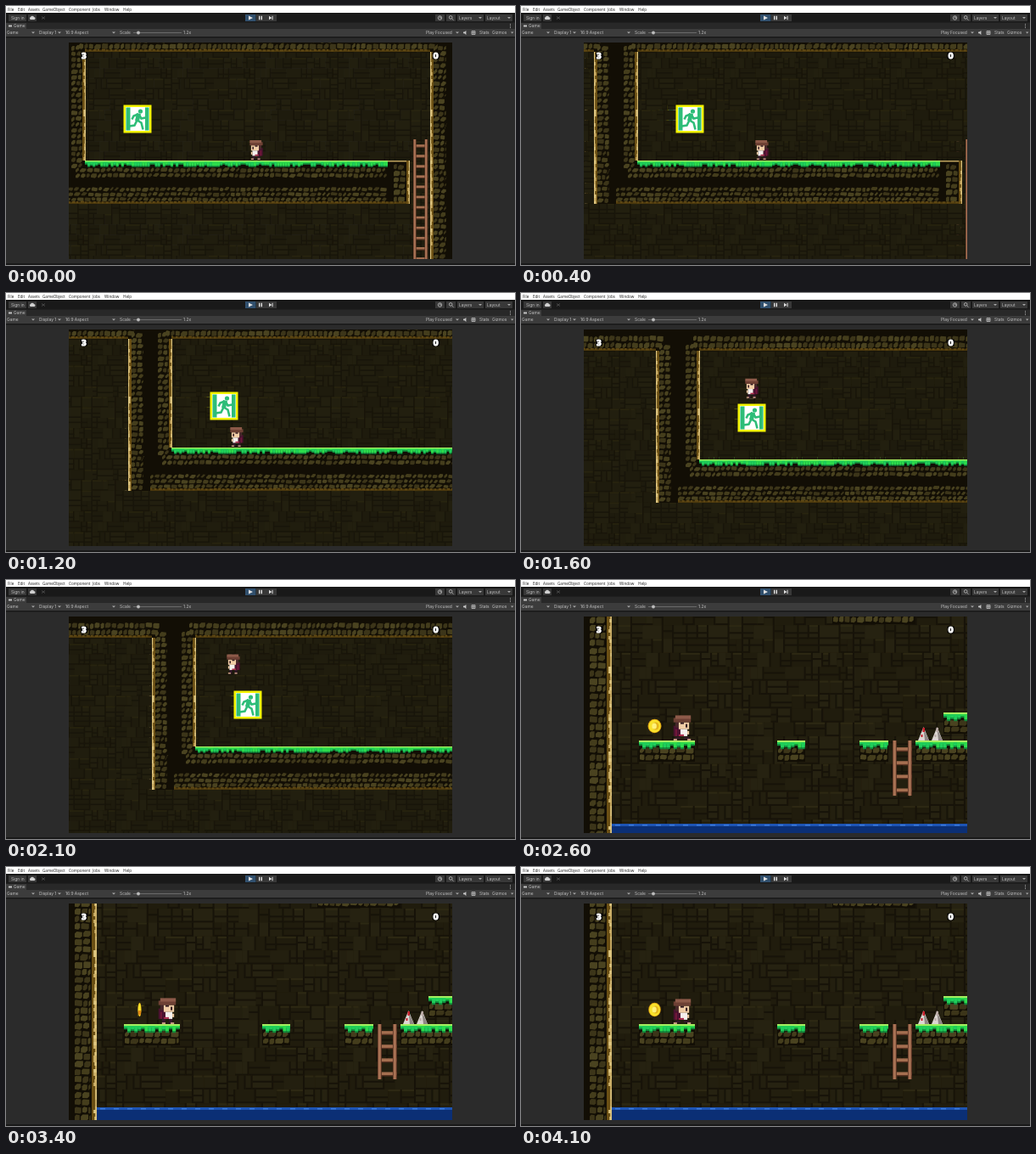
Recreate the animation shown at these times as an HTML page with a canvas. Size 600 px wide and 305 px high, loop 4200 ms.

```html
<!DOCTYPE html>
<html lang="en">
<head>
<meta charset="utf-8">
<title>Platformer in the editor</title>
<style>
html, body { margin: 0; width: 600px; height: 305px; overflow: hidden; background: #2b2b2b; }
svg, canvas { position: absolute; left: 0; top: 0; }
canvas { left: 74px; top: 43px; }
text { font: 4.9px Inter, sans-serif; fill: #c0c0c0; }
.menu text { font: 4.6px "Open Sans", sans-serif; fill: #222; }
</style>
</head>
<body>
<svg width="600" height="305">
  <rect width="600" height="8" fill="#fff"/>
  <g class="menu">
    <text x="2" y="5.6">File</text><text x="14" y="5.6">Edit</text><text x="26" y="5.6">Assets</text>
    <text x="43" y="5.6">GameObject</text><text x="74" y="5.6">Component</text><text x="102" y="5.6">Jobs</text>
    <text x="116" y="5.6">Window</text><text x="138" y="5.6">Help</text>
  </g>
  <path fill="#191919" d="M0 8h600v19H0zM0 36h600v1.5H0zM0 303h600v2H0z"/>
  <path fill="#383838" d="M3 10h21v8H3zM26 10h10v8H26zM295 10h24v8h-24zM506 10h11v8h-11zM519 10h11v8h-11zM532 10h31v8h-31zM565 10h32v8h-32z"/>
  <path fill="#282828" d="M0 19.5h600v7.5H0z"/>
  <path fill="#3c3c3c" d="M0 20h24v7H0zM0 27h600v9H0z"/>
  <path fill="#31506e" d="M282 10h12.5v8H282z"/>
  <path fill="#e0e0e0" d="M286 11.5l5 2.5-5 2.5zM298 11.8h1.4v4.4H298zM300.6 11.8h1.4v4.4h-1.4zM310 11.8l3.4 2.2-3.4 2.2zM313.6 11.8h1v4.4h-1z"/>
  <path fill="#d0d0d0" d="M29 16a1.6 1.6 0 0 1 0-3a2.2 2.2 0 0 1 4 0a1.5 1.5 0 0 1 0 3z"/>
  <path fill="none" stroke="#484848" d="M42 12.5l4 3m0-3l-4 3"/>
  <g fill="none" stroke="#c4c4c4" stroke-width=".8">
    <circle cx="511.5" cy="14" r="2.2"/><path d="M511.5 12.6V14h1.3M525.6 14.8l1.9 1.9"/><circle cx="524.2" cy="13.4" r="1.8"/>
    <path d="M549 29.5h4v4h-4zM551 29.5v4M549 31.5h4"/>
  </g>
  <path fill="#c4c4c4" d="M539 30.5h1.4l2-1.6v5l-2-1.6H539zM3 22.5h4v2H3z"/>
  <path fill="#aaa" d="M557 13h4l-2 2zM591 13h4l-2 2zM30 30.5h4l-2 2zM61 30.5h4l-2 2zM125 30.5h4l-2 2zM530 30.5h4l-2 2zM595 30.5h3.4l-1.7 2zM594 21h1v1h-1zM594 23h1v1h-1zM594 25h1v1h-1z"/>
  <path stroke="#6a6a6a" d="M150 31.5h57"/><circle cx="156" cy="31.5" r="1.9" fill="#bbb"/>
  <text x="6" y="15.9">Sign in</text><text x="534" y="15.9">Layers</text><text x="567" y="15.9">Layout</text>
  <text x="9" y="25.4">Game</text><text x="1" y="33.3">Game</text><text x="39" y="33.3">Display 1</text>
  <text x="70" y="33.3">16:9 Aspect</text><text x="134" y="33.3">Scale</text><text x="209" y="33.3">1.2x</text>
  <text x="495" y="33.3">Play Focused</text><text x="558" y="33.3">Stats</text><text x="573" y="33.3">Gizmos</text>
</svg>
<canvas width="452" height="255"></canvas>
<script>
const LOOP = 4200, STEP = 100, CUT = 2400;
const DARK = '#120e05';
const canvas = document.querySelector('canvas');
let g = canvas.getContext('2d');

let seed = 1;
const rand = () => (seed = seed * 16807 % 2147483647) / 2147483647;
const pick = list => list[Math.floor(rand() * list.length)];

function box(color, x, y, w, h) {
  g.fillStyle = color;
  g.fillRect(x, y, w, h);
}

// Linear interpolation through [time, value] points
function track(t, points) {
  let i = 1;
  while (i < points.length - 1 && t > points[i][0]) i++;
  const [t0, a] = points[i - 1], [t1, b] = points[i];
  return a + (b - a) * (t - t0) / (t1 - t0);
}

function makeBricks(scale, colors, line, light) {
  const tile = document.createElement('canvas'), screen = g;
  tile.width = tile.height = Math.round(64 * scale);
  g = tile.getContext('2d');
  g.scale(tile.width / 64, tile.width / 64);
  seed = 977;
  for (let y = 0; y < 64; y += 8) {
    for (let x = 0; x < 64;) {
      const w = Math.min(64 - x, pick([4, 6, 8, 12])), split = pick([0, 0, 3, 4]);
      box(pick(colors), x, y, w, 8);
      if (rand() < .6) box(line, x, y + 7, w, 1);
      if (rand() < .7) box(line, x + w - 1, y, 1, 8);
      if (split) box(line, x, y + split, w, 1);
      if (rand() < .3) box(light, x, y, w - 1, 1);
      x += w;
    }
  }
  g = screen;
  return g.createPattern(tile, 'repeat');
}

function stones(x, y, w, h, size = 7) {
  seed = 4321 + Math.round(w * 7 + h * 13);
  const rows = Math.max(1, Math.round(h / size)), rh = h / rows;
  for (let r = 0; r < rows; r++) {
    for (let dx = 0; dx < w - 2;) {
      const cw = Math.min(w - dx, size * (.7 + rand() * .6));
      const px = x + dx, py = y + r * rh + rand(), pw = cw - 1.3, ph = rh - 1 - rand(), c = 1 + rand() * 1.8;
      g.fillStyle = pick(['#4a4320', '#443d1c', '#3c3519']);
      g.beginPath();
      g.moveTo(px + c, py);
      g.lineTo(px + pw, py + rand());
      g.lineTo(px + pw, py + ph - c);
      g.lineTo(px + pw - c, py + ph);
      g.lineTo(px, py + ph - rand());
      g.lineTo(px, py + c);
      g.fill();
      dx += cw;
    }
  }
}

// The bright rim faces left (-1) or right (1)
function wallEdge(x, y, h, side, w = 4) {
  box('#6a4f14', x, y, w, h);
  seed = 77;
  for (let d = 0; d < h; d += 4) {
    const rim = w * pick([.3, .45, .65]);
    box(pick(['#dcc47e', '#cdb068']), side < 0 ? x : x + w - rim, y + d, rim, Math.min(4, h - d));
  }
}

function flatEdge(x, y, w) {
  box('#4b380d', x, y, w, 2.5);
  seed = 31;
  for (let d = 0; d < w - 4; d += 5) box('#5f4814', x + d, y - 1 + rand(), 2 + rand() * 2, 2);
}

function grass(x, y, w, k) {
  box('#128a3c', x, y, w, 3 * k);
  box('#26cf46', x, y, w, 2.4 * k);
  box('#a4f060', x, y, w, k);
  seed = 55;
  for (let d = 0; d < w - k; d += 2 * k) {
    const drop = pick([2, 3, 4, 4]) * k, dw = Math.min(2 * k, w - d);
    box('#128a3c', x + d, y + 2 * k, dw, drop - k);
    box(pick(['#1fcf5a', '#2cdc4c']), x + d, y + k, dw, drop - k);
  }
}

function ladder(x, y, h, k) {
  const w = 11.2 * k;
  for (let d = 4 * k; d < h - k; d += 7.9 * k) {
    box('#a56f50', x, y + d, w, 1.8 * k);
    box('#5c3424', x, y + d + 1.8 * k, w, .6 * k);
  }
  for (const rx of [x, x + w - 2.4 * k]) {
    box('#5c3626', rx, y, 2.4 * k, h);
    box('#a87254', rx + .4 * k, y, 1.5 * k, h);
  }
}

function platform(x, y, w, h = 25) {
  box(DARK, x, y, w, h);
  stones(x + 1, y + 8, w - 1, h - 9, 9);
  grass(x, y, w, 2.04);
}

function exitSign(x, y) {
  const green = '#2dbd78';
  box('#f4f400', x, y, 33, 33);
  box('#fff', x + 2.5, y + 2.5, 28, 28);
  box(green, x + 3, y + 3, 5, 27);
  box(green, x + 25.5, y + 3, 4.5, 27);
  g.strokeStyle = g.fillStyle = green;
  g.beginPath();
  g.arc(x + 20, y + 7.5, 2.6, 0, 7);
  g.fill();
  g.lineWidth = 5;
  g.beginPath();
  g.moveTo(x + 18, y + 10);
  g.lineTo(x + 16, y + 19);
  g.stroke();
  g.lineWidth = 2.6;
  g.beginPath();
  for (const limb of [[17, 11, 12, 13, 10, 17], [18, 11, 21, 16, 26, 15], [16, 18, 21, 21, 23, 29], [16, 18, 13, 24, 7, 25]]) {
    g.moveTo(x + limb[0], y + limb[1]);
    g.lineTo(x + limb[2], y + limb[3]);
    g.lineTo(x + limb[4], y + limb[5]);
  }
  g.stroke();
}

function hero(x, feet, k, facing, stride) {
  g.save();
  g.translate(x, feet);
  g.scale(k * facing, k);
  if (stride) {
    box('#33182a', -4, -2, 3, 1);
    box('#33182a', 1, -2, 3, 1);
    box('#c79c82', -5, -1, 2, 1);
    box('#c79c82', 3, -1, 2, 1);
    g.translate(0, .5);
  } else {
    box('#33182a', -3, -3, 2, 3);
    box('#33182a', 1, -3, 2, 3);
    box('#c79c82', -3, -1, 2, 1);
    box('#c79c82', 2, -1, 2, 1);
  }
  box('#4a1230', -5, -9, 4, 6);
  box('#74183a', -4, -7, 1, 4);
  box('#47282a', -4, -12, 3, 4);
  box('#f1cda6', -2, -11, 6, 4);
  box('#301820', 2, -10, 1, 2);
  box('#301820', -1, -11, 2, 1);
  box('#6d4034', -5, -13.5, 10, 2.5);
  box('#8d5a49', -4, -15, 9, 2);
  box('#f6f0ee', -1, -7, 4, 4);
  box('#a8284a', -2, -4, 3, 1);
  box('#f1cda6', 3, -6, 1, 2);
  g.restore();
}

function spike(x, y, tip) {
  g.fillStyle = '#dcd6d2';
  g.beginPath();
  g.moveTo(x, y);
  g.lineTo(x + 6.5, y - 16);
  g.lineTo(x + 13, y);
  g.fill();
  g.fillStyle = '#8e8684';
  g.beginPath();
  g.moveTo(x + 8, y);
  g.lineTo(x + 6.5, y - 14);
  g.lineTo(x + 13, y);
  g.fill();
  box(tip, x + 5.5, y - 15, 2.5, 5);
  box(tip, x + 3.5, y - 7, 2, 3);
}

function coin(x, y, t) {
  const turn = Math.cos((t - 2600) / 533 * Math.PI), rx = Math.max(2, 8 * Math.sqrt(Math.abs(turn)));
  const disc = (color, r, ry, dx = 0) => {
    g.fillStyle = color;
    g.beginPath();
    g.ellipse(x + dx, y, r, ry, 0, 0, 7);
    g.fill();
  };
  disc('#d99a10', rx, 8.3);
  disc('#f8e22c', rx * .88, 7.4);
  if (rx > 4) {
    disc('#e5b51c', rx * .5, 4.6, rx * .15);
    disc('#fff27a', rx * .35, 3.6, -rx * .05);
  } else {
    box('#e08a14', x - 1.5, y + 1, 3, 5);
  }
}

const caveBricks = makeBricks(1.53, ['#201d0e', '#221f0f', '#1e1b0d'], '#18150a', '#28240f');
const hallBricks = makeBricks(2.04, ['#231f0f', '#262211', '#201c0d'], '#171309', '#2d2813');

function cave(t) {
  const camX = Math.round(track(t, [[0, 0], [800, 87], [1600, 117], [2100, 130]]));
  const camY = Math.round(14 * Math.min(1, Math.max(0, (t - 1300) / 250)));
  g.translate(camX, camY);
  box(caveBricks, -200, -50, 900, 400);

  box(DARK, -200, -30, 900, 84);
  box(DARK, 42, 29, 51, 204);
  box(DARK, 62, 182, 413, 51);
  box(DARK, 500, 54, 60, 280);
  stones(-200, 36, 252, 16);
  stones(86, 36, 424, 16);
  stones(46, 46, 15, 187);
  stones(77, 46, 14, 146);
  stones(504, 46, 16, 274);
  flatEdge(-200, 51.5, 242);
  flatEdge(93, 51.5, 407);
  wallEdge(42, 54, 179, -1);
  wallEdge(90, 54, 128, 1);
  wallEdge(500, 54, 270, -1);

  stones(82, 190, 368, 13);
  stones(68, 213, 382, 18);
  stones(457, 186, 15, 45);
  flatEdge(68, 230.5, 407);
  box('#bfa45f', 450, 182, 25, 1.5);
  wallEdge(472, 182, 51, 1);
  grass(93, 182, 357, 1.53);
  ladder(480, 157, 170, 1.53);
  exitSign(138.5, 116.5);

  const x = 138 + track(t, [[0, 157], [800, 46], [1600, 17], [2100, 0]]);
  const jump = Math.max(0, 95 * (1 - ((t - 1900) / 600) ** 2));
  hero(Math.round(x), 181 - jump, 1.53, -1, t / STEP % 3 === 2);
}

function hall(t) {
  g.translate(0, Math.round(Math.min(5, 4 * Math.exp((2600 - t) / 250))));
  box(hallBricks, 74, 30, 460, 290);
  box(DARK, 74, 30, 33, 290);
  stones(81, 30, 20, 270, 9);
  wallEdge(101, 30, 270, 1, 6);

  box(DARK, 367, 20, 98, 28);
  stones(368, 30, 96, 17, 9);
  platform(139, 185, 66);
  platform(302, 185, 33);
  platform(399, 185, 34);
  platform(465, 185, 65);
  platform(498, 152, 32);
  spike(468, 185, '#c8202c');
  spike(484, 185, '#b9a9a6');
  ladder(438, 185, 65, 2.04);

  box('#0b2f75', 107, 283, 430, 30);
  box('#1d54b4', 107, 283, 430, 3);
  for (let x = 111; x < 526; x += 16) box('#3a78d8', x, 284, 6, 1.5);

  coin(157.5, 168, t);
  hero(190, 185, 2.04, 1, t / STEP % 3 === 2);
}

function hud() {
  g.font = '900 9px "DejaVu Sans", sans-serif';
  g.textAlign = 'center';
  g.fillStyle = g.strokeStyle = '#fff';
  g.lineWidth = 1;
  for (const [digit, x] of [['3', 92], ['0', 506.7]]) {
    box('#000', x - 4, 54.5, 8, 8);
    g.fillStyle = '#fff';
    g.fillText(digit, x, 62);
    g.strokeText(digit, x, 62);
  }
}

let shown = -1;
function frame() {
  const t = Math.floor(performance.now() % LOOP / STEP) * STEP;
  if (t !== shown) {
    shown = t;
    g.setTransform(1, 0, 0, 1, -74, -43);
    g.save();
    (t < CUT ? cave : hall)(t);
    g.restore();
    hud();
  }
  requestAnimationFrame(frame);
}
frame();
</script>
</body>
</html>
```
